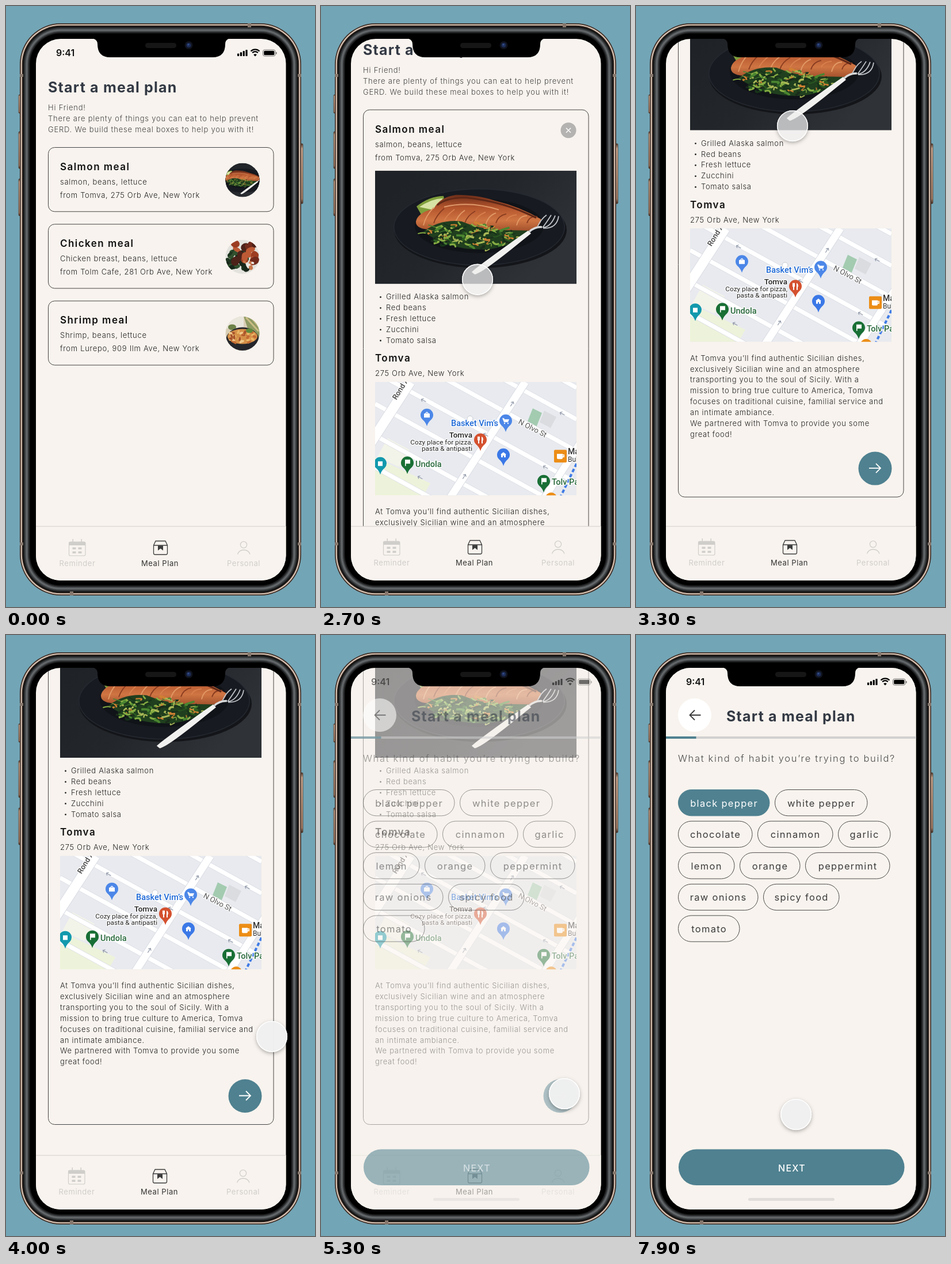
Animation of 537 by 1043 pixels, one loop 8 s. Source, as an HTML page with a canvas:

```html
<!DOCTYPE html>
<html lang="en">
<head>
<meta charset="utf-8">
<title>Meal plan</title>
<style>
  html, body { margin: 0; width: 100%; height: 100%; overflow: hidden; background: #72a5b6; }
  canvas { display: block; width: 537px; height: 1043px; }
</style>
</head>
<body>
<canvas id="stage"></canvas>
<script>
const W = 537, H = 1043, LOOP = 8000, STEP = 100, SCROLL = 334.5;
const PAPER = '#f8f3ee', TEAL = '#4f8190', INK = '#222', SLATE = '#333944', LINE = '#454545';
const SANS = 'Inter, sans-serif', MAP_FONT = 'Roboto, sans-serif';

const canvas = document.getElementById('stage');
const g = canvas.getContext('2d');
const dpr = window.devicePixelRatio || 1;
canvas.width = W * dpr;
canvas.height = H * dpr;

const clamp = (v) => Math.max(0, Math.min(1, v));
const ease = (u) => (u < .5 ? 2 * u * u : 1 - 2 * (1 - u) * (1 - u));
const span = (t, a, b) => clamp((t - a) / (b - a));

function seeded(seed) {
  return () => (seed = (seed * 16807) % 2147483647) / 2147483647;
}

function fill(color) { g.fillStyle = color; g.fill(); }

function stroke(color, width = 1) {
  g.strokeStyle = color;
  g.lineWidth = width;
  g.stroke();
}

function box(x, y, w, h, r = 0) {
  g.beginPath();
  g.roundRect(x, y, w, h, r);
}

function disc(x, y, r, color) {
  g.beginPath();
  g.arc(x, y, r, 0, Math.PI * 2);
  if (color) fill(color);
}

function oval(x, y, rx, ry, color, turn = 0) {
  g.beginPath();
  g.ellipse(x, y, rx, ry, turn, 0, Math.PI * 2);
  fill(color);
}

function path(d, color, width) {
  const p = new Path2D(d);
  if (width) {
    g.strokeStyle = color;
    g.lineWidth = width;
    g.stroke(p);
  } else {
    g.fillStyle = color;
    g.fill(p);
  }
}

function text(s, x, y, { size = 13, weight = 300, color = INK, gap = .7, align = 'left', font = SANS } = {}) {
  g.font = `${weight} ${size}px ${font}`;
  g.letterSpacing = gap + 'px';
  g.textAlign = align;
  g.fillStyle = color;
  g.fillText(s, x, y);
}

function within(x, y, paint) {
  g.save();
  g.translate(x, y);
  paint();
  g.restore();
}

const heading = { size: 25, weight: 700, color: SLATE, gap: 1.2 };
const subhead = { size: 17, weight: 600, color: '#111', gap: 1.45 };
const intro = { color: '#444', gap: .78 };

// Phone

const SHELL = [
  [0, '#3f2f27'], [1.7, '#dcc7b7'], [3.8, '#3a2c25'], [5, '#141313'], [7, '#26292a'],
  [8.5, '#404446'], [10.5, '#65696b'], [12.5, '#575b5d'], [14, '#393b3d'], [15.5, '#1d1e1f'], [17.5, '#000']
];

function sideButton(x, y, h) {
  const tone = g.createLinearGradient(0, y, 0, y + h);
  tone.addColorStop(0, '#4a352a');
  tone.addColorStop(.08, '#d1ac92');
  tone.addColorStop(.92, '#a98067');
  tone.addColorStop(1, '#3d2b22');
  box(x, y, 5, h, 1.5);
  fill(tone);
  stroke('#4d382d', .8);
}

function phone() {
  sideButton(22, 154, 32);
  sideButton(22, 218, 64);
  sideButton(22, 300, 64);
  sideButton(511, 239, 104);
  for (const [d, color] of SHELL) {
    box(24 + d, 30 + d, 489 - 2 * d, 993 - 2 * d, 71 - d);
    fill(color);
  }
  g.fillStyle = '#86776c';
  for (const y of [118, 931]) {
    g.fillRect(24, y, 6, 5);
    g.fillRect(507, y, 6, 5);
  }
  g.fillRect(420, 30, 6, 7);
  g.fillRect(111, 1016, 6, 7);
}

function notch() {
  path('M148 56H391Q381 57 381 66Q381 89 359 89H181Q159 89 159 66Q159 57 148 56Z', '#000');
  box(242, 64, 54, 9, 4.5);
  fill('#161617');
  disc(317.5, 68, 7, '#10131d');
  disc(317.5, 68, 4, '#1c2c56');
  disc(317, 67, 1.6, '#35508c');
}

function statusBar() {
  text('9:41', 87, 87, { size: 16, weight: 600, color: '#111', gap: 0 });
  for (let i = 0; i < 4; i++) {
    const h = 4.5 + i * 2.2;
    box(402 + i * 4.8, 87 - h, 3.2, h, .8);
    fill('#000');
  }
  for (const r of [10.6, 6.8]) {
    g.beginPath();
    g.arc(433, 86, r, -Math.PI * .75, -Math.PI * .25);
    stroke('#000', 2.3);
  }
  path('M433 87.5L430.2 84.5Q433 82 435.8 84.5Z', '#000');
  box(446.5, 76, 21.5, 11, 3);
  stroke('#777');
  box(448.2, 77.7, 18.1, 7.6, 1.6);
  fill('#000');
  box(469, 79.8, 1.6, 4, .8);
  fill('#777');
}

// Food pictures

function salmonPhoto() {
  const back = g.createLinearGradient(60, 0, 260, 197);
  back.addColorStop(0, '#1f2327');
  back.addColorStop(.5, '#23262b');
  back.addColorStop(1, '#2f3237');
  g.fillStyle = back;
  g.fillRect(0, 0, 350, 197);
  oval(183, 103, 150, 66, '#131519');
  oval(181, 98, 149, 67, '#252931');
  oval(181, 98, 147.5, 65.5, '#171a20');
  oval(181, 96, 112, 47, '#101318');
  path('M72 62Q95 44 119 44Q123 58 108 72L80 76Z', '#7f9f3c');
  path('M77 63Q98 49 117 48Q118 58 105 69Z', '#d7e3a4');

  const fish = g.createLinearGradient(0, 42, 0, 106);
  fish.addColorStop(0, '#6d2e1a');
  fish.addColorStop(.35, '#b4552d');
  fish.addColorStop(.7, '#cf7543');
  fish.addColorStop(1, '#a04e2b');
  path('M71 88Q74 73 102 66Q112 46 141 42Q180 42 208 52Q250 62 288 84Q291 97 262 106L200 108Q140 104 91 102Q70 100 71 88Z', fish);
  for (let i = 0; i < 11; i++) {
    const x = 84 + i * 18;
    path(`M${x} ${95 - i % 3 * 4}Q${x + 4} 78 ${x + 18} ${64 + i * 1.6}`, ['#e29a66', '#8a3c20', '#d8814e'][i % 3], 1.8);
  }
  path('M108 60Q125 46 160 47Q225 54 280 82', '#5f2817', 3);
  path('M120 63Q165 52 215 68', '#e09a6c', 2);

  const rnd = seeded(71);
  const greens = ['#2c5e22', '#4a8530', '#86ad42', '#16331a', '#d08032', '#a9b856', '#1a2c1b'];
  path('M84 106Q112 84 150 88Q178 100 214 103L268 104Q250 128 200 136Q135 142 84 106Z', '#203f1e');
  for (let i = 0; i < 130; i++) {
    const a = rnd() * Math.PI * 2, r = Math.sqrt(rnd());
    const x = 170 + Math.cos(a) * r * 86, y = 114 + Math.sin(a) * r * 21 - (x < 190 ? 3 : -3);
    g.beginPath();
    g.moveTo(x, y);
    g.quadraticCurveTo(x + rnd() * 24 - 12, y + rnd() * 16 - 8, x + rnd() * 28 - 14, y + rnd() * 12 - 6);
    stroke(greens[Math.floor(rnd() * greens.length)], 1.4 + rnd() * 2.8);
  }

  path('M168 176Q170 172 250 115L266 104L271 109L256 121Q185 179 173 180Z', '#f1f1ef');
  path('M268 106Q278 97 290 98', '#d9dadb', 3.5);
  path('M282 98Q288 84 298 77M291 99Q298 90 306 77M292 99Q306 97 313 78M292 100Q316 101 319 79', '#bfc3c7', 1.8);
}

function chickenPhoto() {
  disc(0, 0, 30, '#e3e2dd');
  const rnd = seeded(19);
  const blobs = (n, x, y, w, h, colors, size) => {
    for (let i = 0; i < n; i++) {
      oval(x + rnd() * w, y + rnd() * h, size * (.6 + rnd() * .5), size * (.4 + rnd() * .5), colors[i % colors.length], rnd() * 3);
    }
  };
  blobs(34, -26, -8, 34, 29, ['#1e3420', '#31512e', '#18261a'], 6);
  blobs(20, -13, -23, 36, 31, ['#9c3d22', '#712a1b', '#bc5a35', '#4c2219'], 8);
  blobs(6, 2, 9, 17, 10, ['#c9764c', '#ece9e2'], 4);
}

function shrimpPhoto() {
  disc(0, 0, 30, '#d9cfb7');
  path('M-30 -30H2V-9H-30Z', '#e9e6dc');
  path('M2 -30H30V6L12 0Z', '#8e9a63');
  path('M6 -28L28 -4M15 -28L30 -10', '#cbbd85', 3);
  oval(-18, -11, 7, 5, '#6c8147');
  oval(0, 12, 29, 23, '#25262c');
  oval(0, 5, 26, 13, '#d59048');
  const rnd = seeded(43);
  for (let i = 0; i < 34; i++) {
    oval(-22 + rnd() * 44, -4 + rnd() * 20, 3.5, 2, ['#eab765', '#c36a33', '#f0c98b', '#a9532c'][i % 4], rnd() * 3);
  }
  oval(12, -5, 6, 4, '#5f8a3c');
}

function thumb(y, paint) {
  within(411, y, () => {
    disc(0, 0, 29.5);
    g.clip();
    paint();
  });
}

// Map

function pin(x, y, color, mark) {
  within(x, y, () => {
    path('M0 19Q-2 12 -8 7A11 11 0 1 1 8 7Q2 12 0 19Z', color);
    if (mark) path(mark, '#fff');
  });
}

const FLAG = 'M-4 -6H5V1H-2.4V5H-4Z';
const BAG = 'M-5 -3H5V4H-5ZM-3 -3Q0 -9 3 -3H1.5Q0 -6 -1.5 -3Z';
const CART = 'M-6 -5H-3L-2 -3H6L4 2H-3ZM-3 3H-1V5H-3ZM3 3H5V5H3Z';
const FORK = 'M-5 -6H-1V0L-2 1V6H-4V1L-5 0ZM2 -6Q5 -5 5 0L4 1V6H2Z';
const HOUSE = 'M0 -5L5 -1H4V4H1V1H-1V4H-4V-1H-5Z';

function mapView() {
  box(0, 0, 350, 197);
  g.clip();
  g.fillStyle = '#e8eaef';
  g.fillRect(0, 0, 350, 197);
  path('M0 131L96 176L84 197H0Z', '#edf3da');
  path('M22 98L60 118L42 148L4 130Z', '#f3f4e9');
  path('M274 46L290 54L280 79L264 71Z', '#a3cbb0');
  path('M294 50L315 61L305 80L286 70Z', '#dadce0');
  for (let k = -4; k < 6; k++) {
    const y = -72 + 55 * k;
    path(`M0 ${y}L350 ${y + 192}`, '#d9dce3', 9);
    path(`M0 ${y}L350 ${y + 192}`, '#fff', 7.5);
  }
  for (const [x, w] of [[0, 17], [200, 13], [364, 12]]) {
    path(`M${x + 61} 0L${x - 72} 205`, '#d9dce3', w + 2);
    path(`M${x + 61} 0L${x - 72} 205`, '#fff', w);
  }
  for (const [x, y, a] of [[84, 32, 3.65], [192, 92, 3.65], [78, 166, 3.65], [325, 55, 3.65], [296, 148, 3.65], [238, 38, -1], [155, 164, -1]]) {
    within(x, y, () => {
      g.rotate(a);
      path('M-5 0H4M1 -3L4 0L1 3', '#929aaa', 1.2);
    });
  }
  g.setLineDash([6, 4]);
  path('M350 142L322 200', '#3f7be6', 4);
  g.setLineDash([]);

  disc(165, 64, 5, '#fff');
  stroke('#c7cbd2');
  pin(90, 58, '#4c87e8', BAG);
  pin(227, 68, '#4c87e8', CART);
  pin(183, 101, '#d4512f', FORK);
  pin(223, 127, '#3b78e7', HOUSE);
  pin(9, 142, '#1299ad', 'M-4 -4H4V4H-4Z');
  pin(56, 141, '#186f35', FLAG);
  pin(293, 173, '#186f35', FLAG);
  box(311, 118, 22, 22, 2);
  fill('#ec8d16');
  path('M316 125H326V132Q326 134 323 134H319Q316 134 316 132ZM326 126H329V131H326V129H327.5V127.5H326Z', '#fff');
  disc(306, 202, 10, '#ec8d16');

  const label = (s, x, y, size, weight, color, align = 'left') => {
    g.lineJoin = 'round';
    g.font = `${weight} ${size}px ${MAP_FONT}`;
    g.letterSpacing = '0px';
    g.textAlign = align;
    g.strokeStyle = '#fff';
    g.lineWidth = 2.5;
    g.strokeText(s, x, y);
    text(s, x, y, { size, weight, color, align, gap: 0, font: MAP_FONT });
  };
  label('Basket Vim’s', 214, 77, 14.5, 500, '#1b67d6', 'right');
  label('Tomva', 169, 97, 13.5, 500, '#222', 'right');
  label('Cozy place for pizza,', 169, 109, 11.8, 400, '#222', 'right');
  label('pasta & antipasti', 169, 120, 11.8, 400, '#222', 'right');
  label('Undola', 70, 148, 14.5, 500, '#27683b');
  label('Tolv Pa', 307, 179, 14.5, 500, '#27683b');
  label('Ma', 335, 126, 14, 500, '#333');
  label('Bub', 335, 139, 12, 400, '#333');
  within(37, 32, () => { g.rotate(-1.02); label('Rond A', 0, 0, 13, 500, '#444'); });
  within(248, 72, () => { g.rotate(.48); label('N Olvo St', 0, 0, 13, 400, '#555'); });
}

// Screens

const MEALS = [
  ['Salmon meal', 'salmon, beans, lettuce', 'from Tomva, 275 Orb Ave, New York',
    () => { g.scale(.3, .3); g.translate(-180, -98); salmonPhoto(); }],
  ['Chicken meal', 'Chicken breast, beans, lettuce', 'from Tolm Cafe, 281 Orb Ave, New York', chickenPhoto],
  ['Shrimp meal', 'Shrimp, beans, lettuce', 'from Lurepo, 909 Ilm Ave, New York', shrimpPhoto]
];
const BULLETS = ['Grilled Alaska salmon', 'Red beans', 'Fresh lettuce', 'Zucchini', 'Tomato salsa'];
const STORY = [
  'At Tomva you’ll find authentic Sicilian dishes,',
  'exclusively Sicilian wine and an atmosphere',
  'transporting you to the soul of Sicily. With a',
  'mission to bring true culture to America, Tomva',
  'focuses on traditional cuisine, familial service and',
  'an intimate ambiance.',
  'We partnered with Tomva to provide you some',
  'great food!'
];
const CHIPS = [
  [['black pepper', 73, 232], ['white pepper', 241, 402]],
  [['chocolate', 73, 202], ['cinnamon', 211, 342], ['garlic', 351, 442]],
  [['lemon', 73, 171], ['orange', 180, 285], ['peppermint', 294, 441]],
  [['raw onions', 73, 212], ['spicy food', 221, 353]],
  [['tomato', 73, 180]]
];

function greeting() {
  statusBar();
  text('Start a meal plan', 73, 150, heading);
  text('Hi Friend!', 73, 181, intro);
  text('There are plenty of things you can eat to help prevent', 73, 200, intro);
  text('GERD. We build these meal boxes to help you with it!', 73, 219, intro);
}

function cardText([name, food, place], y) {
  text(name, 94, y + 39.5, subhead);
  text(food, 94, y + 64.5);
  text(place, 94, y + 87.5);
}

function mealList() {
  greeting();
  MEALS.forEach((meal, i) => {
    const y = 245.5 + i * 133.2;
    box(73.5, y, 391.5, 111.3, 11);
    stroke(LINE);
    cardText(meal, y);
    thumb(y + 56.5, meal[3]);
  });
}

function mealDetail() {
  greeting();
  box(73.5, 245.5, 391.5, 938.5, 11);
  stroke(LINE);
  cardText(MEALS[0], 245.5);
  disc(430, 281, 13.5, '#b4b3b1');
  path('M426 277L434 285M434 277L426 285', '#fff', 1.4);
  within(94, 351, () => {
    box(0, 0, 350, 196.5);
    g.clip();
    salmonPhoto();
  });
  BULLETS.forEach((s, i) => {
    const y = 574.5 + i * 18.9;
    disc(103.5, y - 4, 1.4, INK);
    text(s, 113, y);
  });
  text('Tomva', 94, 682.5, subhead);
  text('275 Orb Ave, New York', 94, 707.5);
  within(94, 717.7, mapView);
  STORY.forEach((s, i) => text(s, 94, 947.5 + i * 18.9));
  disc(415.5, 1134.5, 29, TEAL);
  path('M405 1134H425M417 1126L425 1134L417 1142', '#fff', 1.8);
}

function tabBar(shift) {
  g.fillStyle = PAPER;
  g.fillRect(52, 903, 435, 95);
  g.fillStyle = '#dad6d3';
  g.fillRect(52, 902.5, 435, 1.2);
  const pale = '#d0cecb', dark = '#3c3c3c';
  within(shift, shift, () => {
    box(109.5, 930, 28.5, 24, 2.5);
    stroke(pale, 1.2);
    g.fillStyle = pale;
    g.fillRect(109.5, 930, 28.5, 6);
    g.fillRect(115.5, 925, 1.5, 6);
    g.fillRect(130.5, 925, 1.5, 6);
    for (let i = 0; i < 4; i++) g.fillRect(115.5 + i % 2 * 10, 939.5 + (i >> 1) * 7, 6, 3.5);

    path('M256.5 936L260 928.5H277L280.5 936V949.5Q280.5 952 278 952H259Q256.5 952 256.5 949.5ZM256.5 936H280.5', dark, 1.3);
    path('M264 936.5H273V945L268.5 941.5L264 945Z', dark);

    disc(413, 935, 5.6);
    stroke(pale, 1.3);
    path('M402.5 951.5Q405 944 413.3 944Q421.5 944 424 951.5', pale, 1.3);

    const tab = { weight: 400, gap: .55, align: 'center', color: '#cfcdcb' };
    text('Reminder', 124, 971.5, tab);
    text('Meal Plan', 267.5, 971.5, { ...tab, color: '#333' });
    text('Personal', 413, 971.5, tab);
  });
}

function habitForm(picked) {
  g.fillStyle = PAPER;
  g.fillRect(50, 55, 440, 945);
  statusBar();
  disc(102, 139, 29, '#fff');
  path('M112.5 139H93.5M102 130.5L93.5 139L102 147.5', '#3a3a3a', 1.8);
  text('Start a meal plan', 157, 150, heading);
  g.fillStyle = '#d1d1d1';
  g.fillRect(52, 176, 435, 4);
  g.fillStyle = TEAL;
  g.fillRect(52, 176, 52.5, 4);
  text('What kind of habit you’re trying to build?', 73, 220, { size: 16.5, color: '#4c4c4c', gap: 1.65 });
  CHIPS.forEach((row, r) => row.forEach(([name, x0, x1], c) => {
    const y = 268.5 + r * 54.6, on = picked && !r && !c;
    box(x0 + .5, y, x1 - x0 - .5, 45.3, 22.6);
    if (on) fill(TEAL);
    stroke(on ? TEAL : '#4a4a4a');
    text(name, (x0 + x1) / 2 + .6, y + 29, { size: 16.5, weight: 400, color: on ? '#fff' : '#3c3c3c', gap: 1.3, align: 'center' });
  }));
  box(74, 892.5, 392.5, 62.5, 31);
  fill(TEAL);
  text('NEXT', 271, 931, { size: 16, weight: 500, color: '#fff', gap: 1.3, align: 'center' });
  box(195, 977, 150, 5, 2.5);
  fill('#e0dddb');
}

// Pointer: start, end, from, bend, to
const MOVES = [
  [700, 1300, 504, 620, 460, 330, 271, 300],
  [1650, 2250, 271, 300, 290, 430, 272, 540],
  [2400, 3360, 272, 540, 272, 372.75, 272, 540 - SCROLL],
  [3500, 4300, 272, 205.5, 549, 666, 423, 796],
  [5700, 6200, 423, 796, 330, 300, 158, 251],
  [6450, 6750, 158, 251, 150, 275, 158, 291],
  [7200, 8100, 158, 291, 486, 552, 234, 900]
];
const PRESSES = [[1300, 1500], [2300, 3400], [4500, 5100], [6800, 7100]];

function pointer(t) {
  if (t < 800) return;
  const [a, b, x0, y0, cx, cy, x1, y1] = MOVES.filter((m) => m[0] <= t).pop();
  const e = ease(span(t, a, b)), n = 1 - e;
  const x = n * n * x0 + 2 * n * e * cx + e * e * x1;
  const y = n * n * y0 + 2 * n * e * cy + e * e * y1;
  const down = PRESSES.some(([from, to]) => t >= from && t < to);

  g.save();
  g.globalAlpha = span(t, 700, 900);
  // Keep the shadow outside the translucent disc
  g.save();
  g.beginPath();
  g.rect(0, 0, W, H);
  g.arc(x, y, 27, 0, Math.PI * 2);
  g.clip('evenodd');
  g.shadowColor = 'rgba(0,0,0,.3)';
  g.shadowBlur = 6 * dpr;
  g.shadowOffsetY = 2.5 * dpr;
  disc(x, y, 27, '#fff');
  g.restore();
  disc(x, y, 27, down ? 'rgba(240,240,240,.73)' : 'rgba(240,240,240,.98)');
  disc(x, y, 26.3);
  stroke('rgba(255,255,255,.9)', 1.6);
  g.restore();
}

function draw(t) {
  g.setTransform(dpr, 0, 0, dpr, 0, 0);
  g.fillStyle = '#72a5b6';
  g.fillRect(0, 0, W, H);
  phone();

  g.save();
  box(52, 57, 434.5, 940, 43);
  g.clip();
  g.fillStyle = PAPER;
  g.fillRect(50, 55, 440, 945);
  const fade = span(t, 5050, 5500);
  if (fade < 1) {
    if (t < 1500) mealList();
    else within(0, -SCROLL * ease(span(t, 2400, 3360)), mealDetail);
    tabBar(t < 1500 ? 0 : -1);
  }
  if (fade > 0) {
    g.globalAlpha = fade;
    habitForm(t >= 6900);
    g.globalAlpha = 1;
  }
  notch();
  g.restore();
  pointer(t);
}

let last = -1;
function tick() {
  const t = Math.floor((performance.now() % LOOP) / STEP) * STEP;
  if (t !== last) draw(last = t);
  requestAnimationFrame(tick);
}
tick();
</script>
</body>
</html>
```
